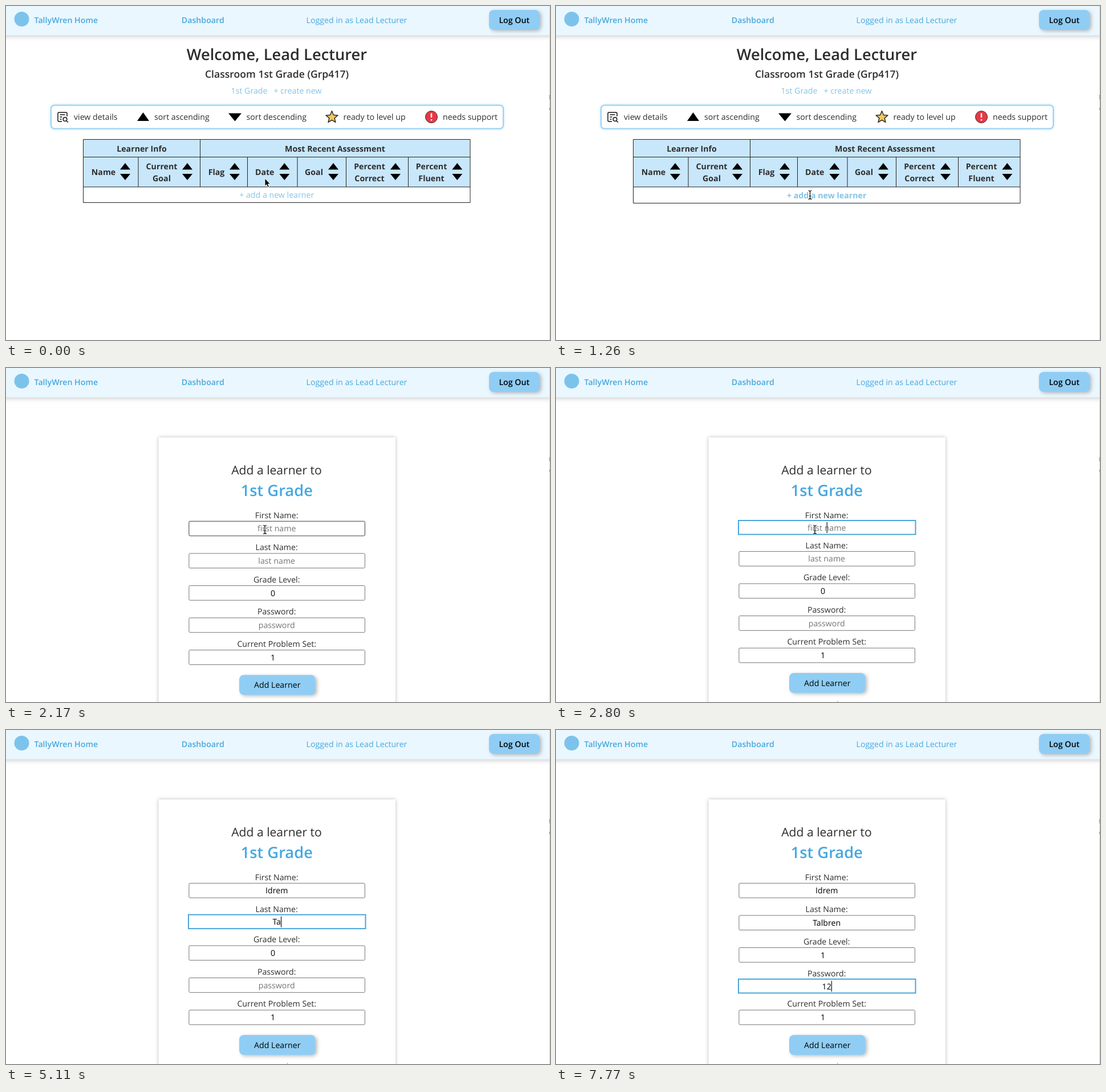
These frames come from a looping animation (954x587 px, 8000 ms). An HTML page:

```html
<!DOCTYPE html>
<html lang="en">
<head>
<meta charset="utf-8">
<title>Classroom dashboard</title>
<style>
  html, body { margin: 0; width: 100%; height: 100%; overflow: hidden; background: #fff; }
  svg { display: block; width: 954px; height: 587px; }
  text { font: 14.2px "Open Sans", sans-serif; fill: #2d2d2d; text-rendering: geometricPrecision; white-space: pre; }
  .nav { fill: #46a8df; }
  .link { fill: #84c3e8; }
  .hint { fill: #757575; }
  .black { fill: #000; }
  .semi { font-weight: 600; }
  .bold { font-weight: 700; }
  .sub { font-size: 17.6px; }
  .lead { font-size: 21.1px; }
  .big { font-size: 27.3px; }
  .mid { text-anchor: middle; }
  .button { fill: #90cdf4; filter: drop-shadow(3px 2px 3px #0004); }
</style>
</head>
<body>
<svg id="stage" viewBox="0 0 954 587"></svg>
<script>
const LOOP = 8000, STEP = 70;
const stage = document.getElementById('stage');
const pen = document.createElement('canvas').getContext('2d');

const text = (x, y, s, cls = '') => `<text x="${x}" y="${y}" class="${cls}">${s}</text>`;
const mid = (x, y, s, cls = '') => text(x, y, s, 'mid ' + cls);
const rect = (x, y, w, h, attrs) => `<rect x="${x}" y="${y}" width="${w}" height="${h}" ${attrs}/>`;
const path = (d, attrs = '') => `<path d="${d}" ${attrs}/>`;
const button = (x, y, w, label, cls) =>
  rect(x, y, w, 35, 'rx="8" class="button"') + mid(x + w / 2, y + 22.7, label, 'black ' + cls);
const triangle = (x, y, half, h) => path(`M${x - half} ${y}h${2 * half}l${-half} ${h}z`);

function navBar() {
  return rect(-10, -10, 974, 61.5, 'fill="#ebf7fe" style="filter:drop-shadow(0 2px 4px #0003)"') +
    '<circle cx="27.5" cy="23" r="13" fill="#7cc3ec"/>' +
    text(49.5, 30, 'TallyWren Home', 'nav semi') +
    mid(345.3, 30, 'Dashboard', 'nav semi') +
    mid(615, 30, 'Logged in as Lead Lecturer', 'nav') +
    button(847, 7, 88.5, 'Log Out', 'semi') +
    path('M953.5 0V587', 'stroke="#d4d4d4"') +
    path('M953.5 157v7M953.5 179v4', 'stroke="#555" stroke-dasharray="2 1"');
}

function legend() {
  const star = Array.from({ length: 10 }, (_, i) => {
    const r = i % 2 ? 4.9 : 11, a = i * Math.PI / 5;
    return `${571.5 + r * Math.sin(a)},${195.5 - r * Math.cos(a)}`;
  }).join(' ');
  const labels = [[119, 'view details'], [260, 'sort ascending'], [421.5, 'sort descending'],
    [591.5, 'ready to level up'], [766, 'needs support']];
  return rect(79, 174.5, 793, 41, 'rx="6" fill="#fff" stroke="#9bd1f2" stroke-width="2" style="filter:drop-shadow(0 0 2px #90cdf4aa)"') +
    path('M98 203h-5a2 2 0 0 1-2-2v-12a2 2 0 0 1 2-2h12a2 2 0 0 1 2 2v5M94.5 191h9M94.5 195h4M94.5 199h3M106 202l3 2.5',
      'fill="none" stroke="#111" stroke-width="1.5"') +
    '<circle cx="103.5" cy="199" r="3.3" fill="none" stroke="#111" stroke-width="1.5"/>' +
    triangle(240.5, 202, 10.5, -15) + triangle(401.5, 188.5, 11.5, 14) +
    `<polygon points="${star}" fill="#f6c65b" stroke="#222" stroke-width="1.4" stroke-linejoin="round"/>` +
    '<circle cx="746" cy="195" r="10.5" fill="#e63946" stroke="#4a2a2c"/>' +
    path('M746 188.5v7.5M746 199v2.4', 'stroke="#fff" stroke-width="2.5"') +
    labels.map(([x, s]) => text(x, 200, s)).join('');
}

function table(hover) {
  const bottom = hover ? 346.5 : 345.5;
  const columns = [[171, 209, 'Name'], [273, 318, 'Current', 'Goal'], [369, 401, 'Flag'], [453.7, 488.3, 'Date'],
    [540, 574, 'Goal'], [637.5, 683, 'Percent', 'Correct'], [746, 791.3, 'Percent', 'Fluent']];
  const heads = columns.map(([x, arrow, top, under]) =>
    (under ? mid(x, 286.7, top, 'bold') + mid(x, 307.5, under, 'bold') : mid(x, 297, top, 'bold')) +
    triangle(arrow, 287.5, 9, -11.5) + triangle(arrow, 295, 9, 11));
  return rect(135.5, 234.5, 678.5, 83.5, 'fill="#c8e7fb"') +
    path(`M135.5 234.5H814V${bottom}H135.5zM135.5 265.5H814M135.5 318H814M340.5 234.5V318` +
      'M232 265.5V318M423.5 265.5V318M511 265.5V318M596.5 265.5V318M705.5 265.5V318', 'fill="none" stroke="#222"') +
    mid(238, 255.5, 'Learner Info', 'bold') + mid(577, 255.5, 'Most Recent Assessment', 'bold') +
    heads.join('') +
    mid(474.7, bottom - 9, '+ add a new learner', hover ? 'link bold' : 'link');
}

function dashboard(hover) {
  return mid(474.8, 95, 'Welcome, Lead Lecturer', 'big semi') +
    mid(475, 125.5, 'Classroom 1st Grade (Grp417)', 'sub semi') +
    text(394.5, 153.7, '1st Grade', 'link') + text(469.5, 153.7, '+ create new', 'link') +
    legend() + table(hover);
}

const keys = {
  first: [3780, 3990, 4130, 4130, 4200],
  last: [4970, 5110, 5320, 5390, 5460, 5600, 5740],
  grade: [6650],
  password: [7630, 7770]
};
const focusTimes = [2380, 4480, 6230, 7140];
const caretResets = [2450, ...focusTimes.slice(1), ...Object.values(keys).flat()];
const passed = (times, t) => times.filter(k => k <= t).length;

function caretOn(t) {
  const last = Math.max(...caretResets.filter(k => k <= t), focusTimes[0]);
  return Math.floor((t - last) / 490) % 2 === 0;
}

function form(t, cursor) {
  const typed = (word, name) => word.slice(0, passed(keys[name], t));
  const fields = [
    ['First Name:', typed('Idrem', 'first'), 'first name'],
    ['Last Name:', typed('Talbren', 'last'), 'last name'],
    ['Grade Level:', typed('1', 'grade') || '0'],
    ['Password:', typed('12', 'password'), 'password'],
    ['Current Problem Set:', '1']
  ];
  const focus = passed(focusTimes, t) - 1;
  const selected = focus === 2 && t < keys.grade[0];
  pen.font = '14.2px "Open Sans", sans-serif';

  const rows = fields.map(([label, value, hint], i) => {
    const active = i === focus;
    const top = 269 + 56.6 * i - (focus >= 0 && i > focus ? 3.5 : 0);
    const x = hint ? 474.7 : 468, base = top + (active ? 16.7 : 18.3);
    const hover = cursor && cursor.y > top && cursor.y < top + 26;
    let out = mid(474.7, top - 5.5, label);
    out += active
      ? rect(320, top - 1, 310.5, 24.5, 'fill="#fff" stroke="#4aa5d9" stroke-width="2"')
      : rect(320.9, top + .3, 308.5, 25.7, `rx="2" fill="#fff" stroke="${hover ? '#3c3c3c' : '#767676'}"`);
    if (active && i === 2) {
      out += rect(615, top, 14.5, 22.5, 'fill="#efefef"') +
        triangle(621.5, top + 8.5, 3.2, -3.5) + triangle(621.5, top + 15, 3.2, 3.5);
    }
    if (active && selected) out += rect(463.8, top + 1, 8.6, 20.5, 'fill="#b4d7f5"');
    out += mid(x, base, value || hint, value ? 'black' : 'hint');
    if (active && !selected && caretOn(t)) {
      out += rect(x + pen.measureText(value).width / 2, top + 2, 1.1, 19, '');
    }
    return out;
  });

  return rect(267.5, 122, 415.5, 500, 'fill="#fff" style="filter:drop-shadow(0 0 3px #0004)"') +
    mid(474.5, 186.5, 'Add a learner to', 'lead') +
    mid(474.8, 224.5, '1st Grade', 'nav big semi') +
    rows.join('') +
    button(409, focus < 0 ? 539.5 : 536, 133.5, 'Add Learner', '') +
    (focus < 0 ? '' : rect(493, 585, 1.4, 2, 'fill="#84c3e8"'));
}

function cursorAt(t) {
  const glide = (start, steps, [x0, y0], [x1, y1]) => {
    const p = Math.min(1, Math.max(0, ((t - start) / STEP + 1) / steps));
    const e = p * p * (3 - 2 * p);
    return { x: x0 + (x1 - x0) * e, y: y0 + (y1 - y0) * e };
  };
  if (t >= keys.first[0]) return null;
  return t < 1330 ? glide(140, 8, [454, 303], [445.5, 332]) : glide(1890, 5, [445.5, 332], [454, 284]);
}

function drawCursor({ x, y }, beam) {
  const at = `transform="translate(${x} ${y})"`;
  if (!beam) return path('M0 0V13.5L3 10.8L5 15.6L7.4 14.6L5.4 9.9H9.4z', at + ' stroke="#fff" stroke-width=".9"');
  const d = 'M-3-7.5Q0-7.5 0-5.5Q0-7.5 3-7.5M0-5.5V5.5M-3 7.5Q0 7.5 0 5.5Q0 7.5 3 7.5M-1.5 2h3';
  return path(d, at + ' fill="none" stroke="#fff" stroke-width="2.6"') +
    path(d, at + ' fill="none" stroke="#000" stroke-width="1.2"');
}

let shown = '';
function frame() {
  const t = Math.floor(performance.now() % LOOP / STEP) * STEP;
  const cursor = cursorAt(t);
  const onForm = t >= 1330;
  const hover = !onForm && cursor.y > 320;
  const markup = (onForm ? form(t, cursor) : dashboard(hover)) + navBar() +
    (cursor ? drawCursor(cursor, onForm || hover) : '');
  if (markup !== shown) stage.innerHTML = shown = markup;
  requestAnimationFrame(frame);
}
frame();
</script>
</body>
</html>
```
